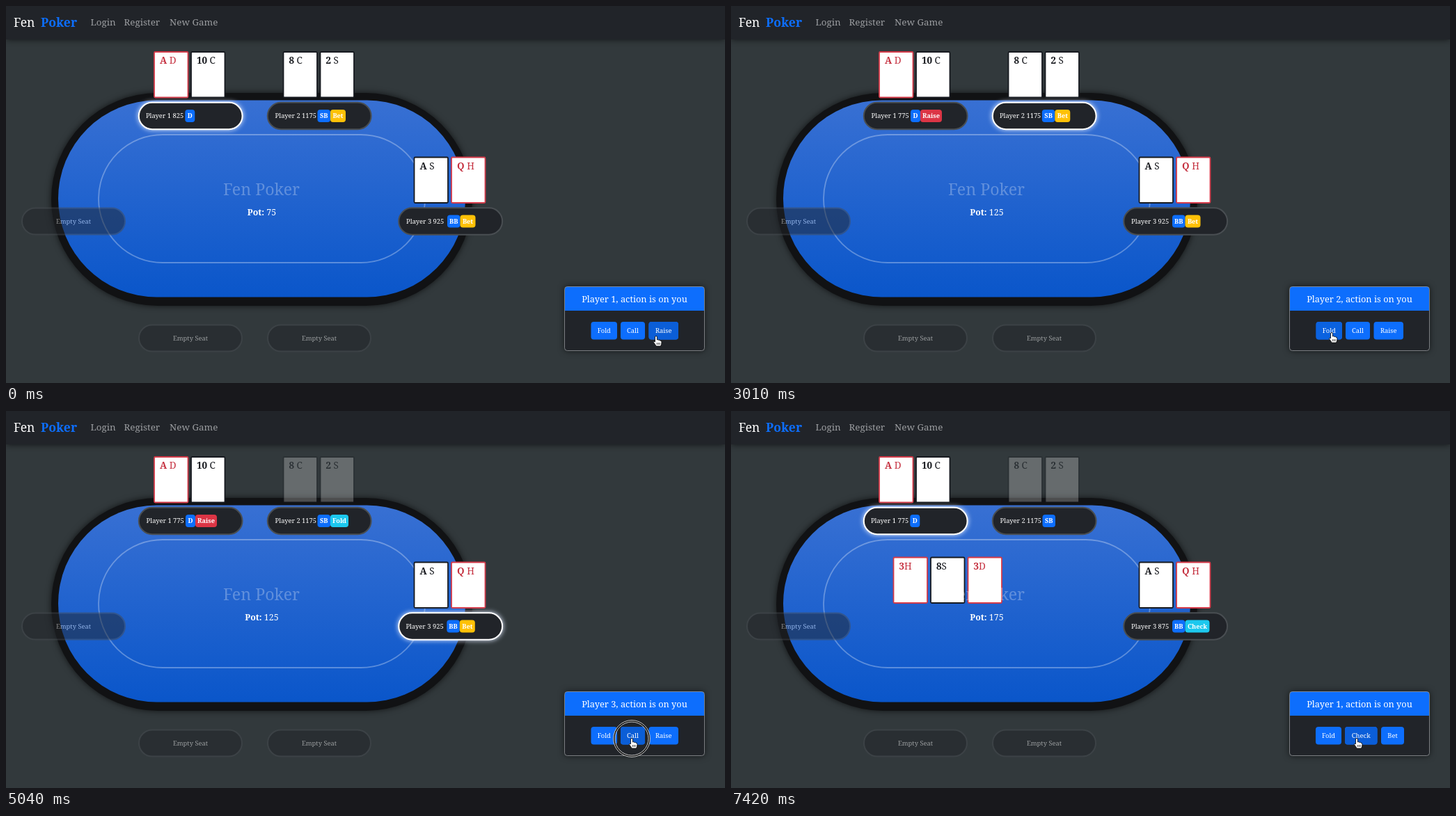
These frames come from a looping animation (1033x542 px, 8000 ms). An HTML page:

```html
<!DOCTYPE html>
<html lang="en">
<head>
<meta charset="utf-8">
<title>Fen Poker</title>
<style>
  html, body { margin: 0; width: 100%; height: 100%; overflow: hidden; background: #32393c; }
  svg { display: block; width: 100%; height: 100%; font: 500 9.4px "Noto Serif", serif; fill: #fff; }
  .bold { font-weight: 700; }
  .nav { font-size: 13.4px; fill: #9b9da0; }
  .brand { font-size: 17.6px; }
  .badge { font-size: 9.2px; font-weight: 700; }
  .card { font-size: 13.5px; font-weight: 400; }
  .mark { font-size: 23.2px; opacity: .28; }
  .pot { font-size: 12.4px; }
  .title { font-size: 12.8px; }
  .shadow { filter: drop-shadow(0 0 5px #000a); }
  .glow { filter: drop-shadow(0 0 3.5px #dfeaff); }
</style>
</head>
<body>
<svg id="stage" viewBox="0 0 1033 542"></svg>
<script>
const DURATION = 8000, STEP = 70;
const BLUE = '#0d6efd', RED = '#c5303f', DARK = '#212429';

const seats = [
  { x: 190, y: 138, role: 'D', roleX: 68, roleW: 14, cards: [[212, 65, 'A', ' D'], [265, 65, '10', ' C']] },
  { x: 375, y: 138, role: 'SB', roleX: 72.5, roleW: 18.5, cards: [[397.5, 65, '8', ' C'], [450.5, 65, '2', ' S']] },
  { x: 563.5, y: 289.5, role: 'BB', roleX: 70.5, roleW: 18.5, cards: [[585.5, 216.5, 'A', ' S'], [639, 216.5, 'Q', ' H']] },
];
const emptySeats = [[22, 289.5], [190, 457.5], [375, 457.5]];
const flop = [[232.5, 209.5, '3', 'H'], [286, 209.5, '8', 'S'], [339.5, 209.5, '3', 'D']];
const tagStyles = {
  Bet: ['#ffc107', 22], Raise: ['#dc3545', 31], Fold: ['#1cc8ee', 26], Check: ['#1cc8ee', 35],
};
const preflop = [['Fold', 840.5, 37.5], ['Call', 883, 35], ['Raise', 923.5, 42.5]];
const postflop = [['Fold', 840, 37], ['Check', 882, 46.5], ['Bet', 934, 33]];

const states = [
  { start: -500, turn: 0, pot: 75, stacks: [825, 1175, 925], tags: ['', 'Bet', 'Bet'], buttons: preflop },
  { start: 1750, turn: 1, pot: 125, stacks: [775, 1175, 925], tags: ['Raise', 'Bet', 'Bet'], buttons: preflop },
  { start: 3430, turn: 2, pot: 125, stacks: [775, 1175, 925], tags: ['Raise', 'Fold', 'Bet'], buttons: preflop, folded: true },
  { start: 5110, turn: 2, pot: 175, stacks: [775, 1175, 875], tags: ['', '', ''], buttons: postflop, folded: true, flop: true },
  { start: 7280, turn: 0, pot: 175, stacks: [775, 1175, 875], tags: ['', '', 'Check'], buttons: postflop, folded: true, flop: true },
];
const clicks = [1610, 3290, 4970, 7140];
const hovers = [[2900, 4270], [4340, 9999], [-500, 2700]]; // per button: enter, leave
const path = [ // time, x, y
  [0, 934, 475], [280, 940, 472], [2520, 940, 472], [2590, 935, 470], [3010, 863, 470],
  [4130, 863, 470], [4410, 892, 469], [4760, 899, 471], [DURATION, 899, 471],
];

const clamp = v => Math.max(0, Math.min(1, v));
const rect = (x, y, w, h, r, attrs) =>
  `<rect x="${x}" y="${y}" width="${w}" height="${h}" rx="${r}" ${attrs}/>`;
const text = (x, y, content, cls = '', anchor = 'start') =>
  `<text x="${x}" y="${y}" class="${cls}" text-anchor="${anchor}">${content}</text>`;

function card([x, y, rank, suit]) {
  const red = /[DH]/.test(suit);
  return rect(x + 1, y + 1, 48.5, 65.5, 1.5, `fill="#fff" stroke="${red ? '#d33a49' : '#171a20'}" stroke-width="1.8"`) +
    `<g fill="${red ? RED : '#16181d'}">` +
    text(x + 9, y + 18, `<tspan class="bold">${rank}</tspan>${suit}`, 'card') + '</g>';
}

const badge = (x, y, w, label, color) =>
  rect(x, y, w, 18, 4, `fill="${color}"`) + text(x + w / 2, y + 12.3, label, 'badge', 'middle');

function seat(s, i, state) {
  const active = state.turn === i, tag = state.tags[i];
  const dx = active ? -.7 : 0, roleX = s.x + s.roleX + dx;
  let out = `<g ${state.folded && i === 1 ? 'opacity=".25"' : ''}>${s.cards.map(card).join('')}</g>`;
  out += rect(s.x + .8, s.y + .8, 148.8, 38.4, 19.2,
    `fill="${DARK}" stroke="${active ? '#fff' : '#494e52'}" stroke-width="2" ${active ? 'class="glow"' : ''}`);
  out += text(s.x + 11.6 + dx, s.y + 23.2, `Player ${i + 1} ${state.stacks[i]}`);
  out += badge(roleX, s.y + 11, s.roleW, s.role, BLUE);
  if (tag) out += badge(roleX + s.roleW, s.y + 11, tagStyles[tag][1], tag, tagStyles[tag][0]);
  return out;
}

const emptySeat = ([x, y]) => '<g opacity=".5">' +
  rect(x + 1, y + 1, 148, 38, 19, `fill="${DARK}" stroke="#464b50" stroke-width="2"`) +
  text(x + 75, y + 23.4, 'Empty Seat', '', 'middle') + '</g>';

const header = rect(0, 0, 1033, 48, 0, `fill="${DARK}" class="shadow"`) +
  text(11, 29.5, 'Fen', 'brand') +
  `<g fill="${BLUE}">${text(50, 29.5, 'Poker', 'brand bold')}</g>` +
  text(121.5, 27.5, 'Login', 'nav') + text(169.5, 27.5, 'Register', 'nav') + text(235, 27.5, 'New Game', 'nav');

const table = `<linearGradient id="felt" x2="0" y2="1">
  <stop stop-color="#3870d3"/><stop offset="1" stop-color="#0a56ca"/></linearGradient>` +
  rect(65, 125, 605, 306, 153, 'fill="#111214" class="shadow"') +
  rect(75, 135.5, 585, 283, 141.5, 'fill="url(#felt)"') +
  rect(133, 185, 469, 184, 92, 'fill="none" stroke="#fff" stroke-opacity=".3" stroke-width="1.8"');

function button([label, x, w], i, t, state) {
  const [enter, leave] = hovers[i];
  const hover = clamp((t - Math.max(enter, state.start)) / 150) * clamp((leave + 150 - t) / 150);
  return rect(x, 454, w, 25.5, 4, `fill="${BLUE}"`) +
    rect(x, 454, w, 25.5, 4, `fill="#0b5ed7" opacity="${hover}"`) +
    text(x + w / 2, 470, label, '', 'middle');
}

const panel = (t, state) =>
  rect(802.5, 403.5, 201, 92, 4, `fill="${DARK}" class="shadow"`) +
  `<path d="M803 438V407q0-3.5 3.5-3.5h193q3.5 0 3.5 3.5V438Z" fill="${BLUE}"/>` +
  rect(802.5, 403.5, 201, 92, 4, 'fill="none" stroke="#9a9da1" stroke-opacity=".75"') +
  text(903, 426, `Player ${state.turn + 1}, action is on you`, 'title', 'middle') +
  state.buttons.map((b, i) => button(b, i, t, state)).join('');

function pointer(t) {
  const i = path.findIndex(p => p[0] > t);
  const [t0, x0, y0] = path[i - 1], [t1, x1, y1] = path[i];
  const p = (t - t0) / (t1 - t0), ease = p * p * (3 - 2 * p);
  const pressed = clicks.some(c => t >= c && t < c + 140);
  const ring = `<g fill="none"><circle r="25.2" stroke="#111" stroke-width="2.6"/>
    <circle r="26.4" stroke="#ddd" stroke-width=".9"/><circle r="24" stroke="#ddd" stroke-width=".9"/></g>`;
  return `<g transform="translate(${x0 + (x1 - x0) * ease} ${y0 + (y1 - y0) * ease})">${pressed ? ring : ''}
    <path stroke="#000" stroke-width=".8" d="M-1.5 1Q-1.5-.5 0-.5T1.4 1V5Q3 4 3.8 5.4 5.4 4.8 6 6.2 8 6 8 8 8 11.5 6.6 14H0Q-1 11.5-3.6 8.5-4 6.6-1.5 7.8Z"/>
    <path stroke="#000" stroke-width=".7" d="M1.3 9v3M3.3 9v3M5.2 9v3"/></g>`;
}

function render(t) {
  const state = states.filter(s => s.start <= t).pop();
  return table + header + emptySeats.map(emptySeat).join('') +
    seats.map((s, i) => seat(s, i, state)).join('') +
    (state.flop ? flop.map(card).join('') : '') +
    text(367, 272, 'Fen Poker', 'mark', 'middle') +
    text(367.5, 301, `<tspan class="bold">Pot:</tspan> ${state.pot}`, 'pot', 'middle') +
    panel(t, state) + pointer(t);
}

const stage = document.getElementById('stage');
let shown = -1;
function tick() {
  const t = Math.floor(performance.now() % DURATION / STEP) * STEP;
  if (t !== shown) stage.innerHTML = render(shown = t);
  requestAnimationFrame(tick);
}
tick();
</script>
</body>
</html>
```
